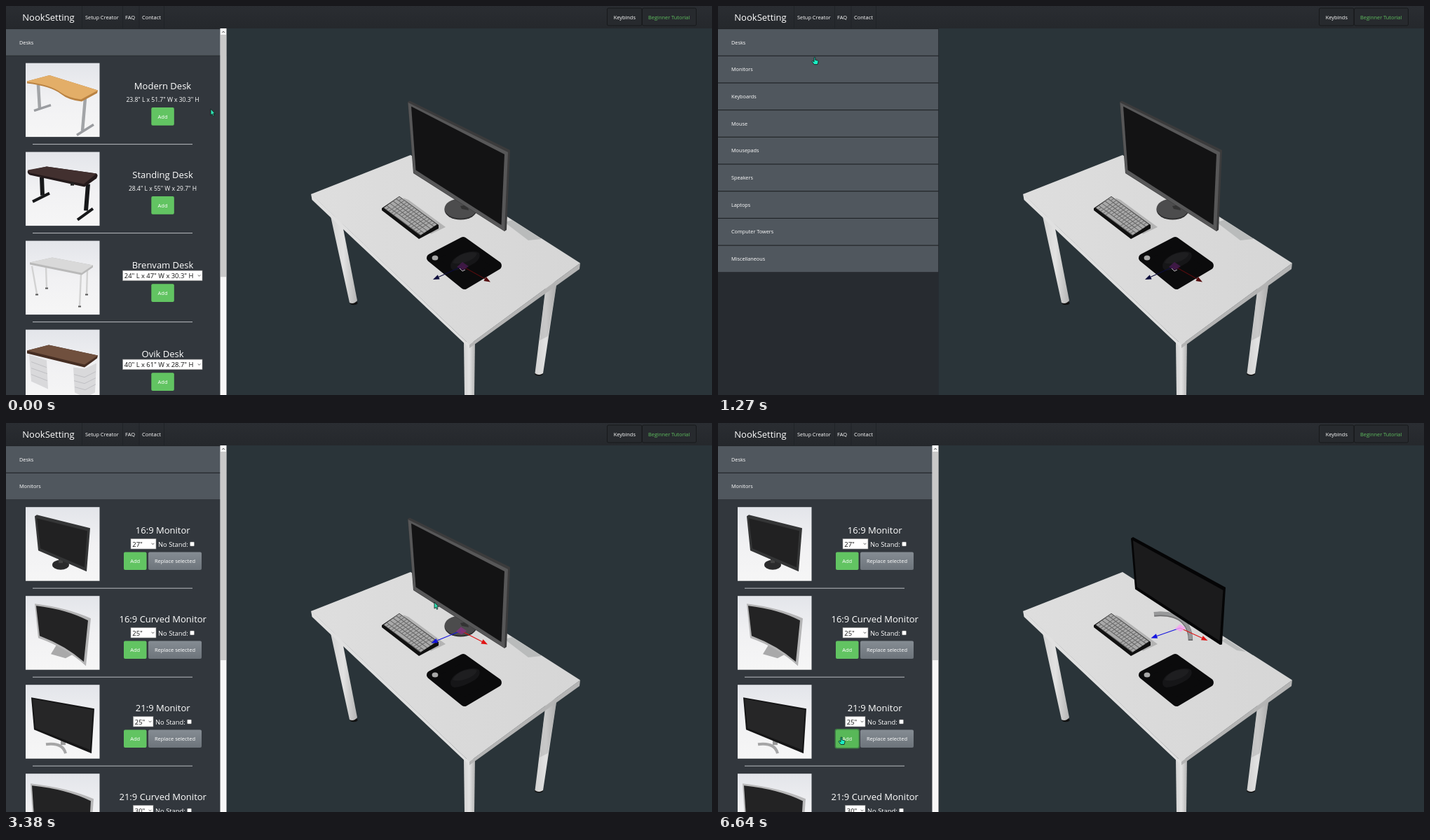
Write an HTML page that moves like this. It is 1007x556 px and loops after 6.82 s.

```html
<!DOCTYPE html>
<html lang="en">
<head>
<meta charset="utf-8">
<title>Desk planner</title>
<style>
html, body { margin: 0; width: 100%; height: 100%; overflow: hidden; background: #272b30; }
svg { display: block; width: 1007px; height: 556px; }
text { font-family: "Open Sans", "Noto Sans", sans-serif; fill: #fff; }
</style>
</head>
<body>
<svg id="stage" viewBox="0 0 1007 556"></svg>
<script>
const LOOP = 6820, ROW = 38.7, TOP = 32.5;

// Drawing helpers
const path = (d, fill, extra = '') => `<path d="${d}" fill="${fill}" ${extra}/>`;
const line = (d, color, width, extra = '') => path(d, 'none', `stroke="${color}" stroke-width="${width}" ${extra}`);
const rect = (x, y, w, h, fill, extra = '') => `<rect x="${x}" y="${y}" width="${w}" height="${h}" fill="${fill}" ${extra}/>`;
const oval = (x, y, rx, ry, fill, extra = '') => `<ellipse cx="${x}" cy="${y}" rx="${rx}" ry="${ry}" fill="${fill}" ${extra}/>`;
const text = (x, y, size, s, extra = '') => `<text x="${x}" y="${y}" font-size="${size}" ${extra}>${s}</text>`;
const mid = (x, y, size, s, extra = '') => text(x, y, size, s, 'text-anchor="middle" ' + extra);
const group = (id, body, extra = '') => `<g id="${id}" ${extra}>${body}</g>`;
const gradient = (id, stops, dir = '') => `<linearGradient id="${id}" ${dir}>` +
  stops.map((c, i) => `<stop offset="${i / (stops.length - 1)}" stop-color="${c}"/>`).join('') + '</linearGradient>';

const defs = '<defs>' +
  gradient('nav', ['#2a2d32', '#25282c'], 'x2="0" y2="1"') +
  gradient('photo', ['#e3e5ea', '#f1f1f3', '#f6f6f6'], 'x2="0" y2="1"') +
  gradient('grey', ['#858c93', '#6d747b'], 'x2="0" y2="1"') +
  gradient('leg', ['#d2d2d2', '#e2e2e2', '#b4b4b4']) +
  gradient('top', ['#dedede', '#d6d6d6']) +
  '<clipPath id="clip"><rect id="clipBox" width="315"/></clipPath></defs>';

// Thumbnails, drawn in a 105 px square
const feet = (d, color, width) => line(d, color, width, 'stroke-linejoin="round"');
const thumbs = {
  modern: feet('M18 31L20 65M85 50L81 97', '#a2a4a7', 4.5) + feet('M12 68L36 60M73 103L97 88', '#9a9ca0', 3.5) +
    path('M2 26L34 17.5L103 39L102 43L80 55Q61 53 50 44Q36 33 2 29z', '#b98242') +
    path('M2 26L34 17.5L103 39L79 52Q61 50 50 42Q36 31 2 27z', '#e3ae68'),
  standing: feet('M23 36L24 62M89 46L86 84', '#17181a', 6) + feet('M10 71L34 59M74 97L96 81', '#17181a', 4) +
    path('M3 27L30 21L101 31Q104 33 101 38L84 50L6 33Q2 31 3 27z', '#241a1b') +
    path('M3 26L30 21L101 31L83 46L6 30z', '#42302f') + rect(64, 44, 5, 4, '#222'),
  white: feet('M9 36L16 76M29 38L30 67M88 42L87 76M79 48L77 93', '#d2d2d2', 2.4) +
    path('M14 76h4v2h-4zM28 67h4v2h-4zM85 76h4v2h-4zM75 93h4v2h-4z', '#555') +
    path('M6 31L38 24L96 35L96 38L80 49L6 34z', '#b9b9b9') + path('M6 31L38 24L96 35L80 46z', '#d9d9d9'),
  drawers: path('M5 36L30 44L32 85L8 74zM68 54L84 56L101 48L99 90L85 97L70 90z', '#d9d9db') +
    line('M8 46L30 54M8 55L31 63M8 64L31 73M69 64L84 68L100 60M69 73L84 77L100 69M70 82L85 86L100 78', '#b9b9bd', .8) +
    path('M2 30L33 22L103 37L102 41L84 54L2 34z', '#452d22') + path('M2 30L33 22L103 37L84 50z', '#70503e'),
  flat: oval(50, 82.5, 12, 7, '#2b2b2c') + rect(47, 72, 6, 8, '#444') +
    path('M13 13L16 11L92 30L87 92L18 62z', '#343536') + path('M16 16L88 34L84 86L21 59z', '#212122'),
  curved: path('M44 70L36 83L57 89L70 82z', '#a9a9aa') +
    path('M13 11Q60 17 93 32L86 100Q58 74 18 60z', '#b4b4b5') + path('M15 14Q58 19 89 35L83 94Q57 71 20 57z', '#232324'),
  wide: line('M29 85Q53 82 57 98', '#a5a5a6', 4) + rect(50, 76, 7, 10, '#999') +
    path('M8 18L98 34L94 98L12 64z', '#151516') + path('M10 20L96 36L92 93L14 62z', '#262627'),
  arc: path('M7 14Q60 20 97 36L92 105H13z', '#b8b8b9') + path('M9 17Q58 22 93 39L89 105H15z', '#232324')
};

// Sidebar items
const button = (x, y, w, label, fill) => rect(x, y, w, 25.6, fill, 'rx="2"') +
  mid(x + w / 2, y + 15.6, 7.5, label);
const select = (x, y, w, label) => rect(x, y, w, 14.5, '#fff', 'stroke="#8a8a8a" stroke-width=".6"') +
  text(x + 2.3, y + 11, 9.4, label, 'style="fill:#111"') +
  line(`M${x + w - 6.3} ${y + 6.3}l1.8 1.8l1.8 -1.8`, '#444', .9);
const item = (y, kind, info, last) =>
  `<g class="pic"><g transform="translate(28 ${y})">${rect(0, 0, 105.5, 105.5, 'url(#photo)')}${thumbs[kind]}</g></g>` +
  `<g class="info">${info}</g>` + (last ? '' : line(`M38 ${y + 116}H266`, '#b9bcc0', 1));

const desk = (i, kind, name, size, list) => {
  const y = 81.6 + 127 * i, add = '#62c462';
  return item(y, kind, mid(223.5, y + (list ? 39.8 : 37.5), 13, name) + (list
    ? select(166.5, y + 42.5, 113.5, size) + button(207.3, y + 61.7, 32.5, 'Add', add)
    : mid(223.5, y + 55.3, 8.56, size) + button(207.3, y + 63.5, 32.5, 'Add', add)), i > 3);
};
const monitor = (i, kind, name, size) => {
  const y = 120.2 + 127 * i, x = i < 2 ? 178 : 181.5, w = i < 2 ? 36 : 28.5, end = x + w;
  return item(y, kind, mid(223.7, y + 37.5, 13, name) + select(x, y + 45.3, w, size) +
    text(end + 3, y + 56.3, 9.4, 'No Stand:') +
    rect(end + 48.5, y + 49.8, 6, 6, '#fff', 'rx="1" stroke="#777" stroke-width=".5"') +
    button(168, y + 64.3, 32.5, 'Add', '#62c462') + button(203, y + 64.3, 76, 'Replace selected', 'url(#grey)'));
};

const headers = ['Desks', 'Monitors', 'Keyboards', 'Mouse', 'Mousepads', 'Speakers', 'Laptops', 'Computer Towers', 'Miscellaneous'];
const sidebar = rect(0, 32, 314.5, 524, '#272b30') +
  '<g clip-path="url(#clip)">' + rect(0, 32, 315, 524, '#32373d') +
  group('desks', desk(0, 'modern', 'Modern Desk', '23.8" L x 51.7" W x 30.3" H') +
    desk(1, 'standing', 'Standing Desk', '28.4" L x 55" W x 29.7" H') +
    desk(2, 'white', 'Brenvam Desk', '24" L x 47" W x 30.3" H', true) +
    desk(3, 'drawers', 'Ovik Desk', '40" L x 61" W x 28.7" H', true)) +
  group('monitors', monitor(0, 'flat', '16:9 Monitor', '27"') + monitor(1, 'curved', '16:9 Curved Monitor', '25"') +
    monitor(2, 'wide', '21:9 Monitor', '25"') + monitor(3, 'arc', '21:9 Curved Monitor', '30"') +
    group('hover', rect(167.3, 437.8, 34, 27, 'none', 'rx="2.5" stroke="#3f7f45" stroke-width="1.6"') +
      button(168, 438.5, 32.5, 'Add', '#58b858'))) + '</g>' +
  headers.map(h => `<g class="head">${rect(0, 0, 314.5, ROW, '#1d2023')}${rect(0, .6, 314.2, ROW - 1.1, '#50575e')}` +
    text(19, 22, 7.3, h) + '</g>').join('') +
  group('scroll', rect(305.5, 32, 9, 524, '#f7f7f7') + rect(306, 41, 8, 0, '#c9c9c9', 'id="thumb"') +
    line('M308.3 38.2L310.1 36.2L311.9 38.2', '#444', 1));

const nav = rect(0, 0, 1007, 32, 'url(#nav)') +
  line('M108.5 0V32M166.5 0V32M190 0V32M225.5 0V32', '#1f2226', .8) +
  text(23.3, 21.2, 13, 'NookSetting') + text(113, 18.8, 7.42, 'Setup Creator') +
  text(170, 18.8, 7.5, 'FAQ') + text(194, 18.8, 7.5, 'Contact') +
  rect(857.5, 3, 49.5, 25, '#272a2e', 'rx="2" stroke="#17191b"') +
  rect(907.5, 3, 77, 25, '#272a2e', 'rx="2" stroke="#17191b"') +
  mid(882.3, 18.8, 7.4, 'Keybinds') + mid(945.7, 18.8, 7.4, 'Beginner Tutorial', 'style="fill:#5fbf5f"');

// Scene
const keyboard = () => {
  const at = (u, v) => `${561 - 22.5 * u + 54 * v - u * v} ${272.5 + 16 * u + 40 * v - u * v}`;
  const key = (r, c, w) => {
    const u = (r + .08) / 5, U = (r + .88) / 5, v = (c + .1) / 15, V = (c + w - .1) / 15;
    return path(`M${at(u, v)}L${at(u, V)}L${at(U, V)}L${at(U, v)}z`, '#a9a9a9');
  };
  let keys = '';
  for (let r = 0; r < 5; r++)
    for (let c = 0, w; c < 15; c += w) {
      w = r == 4 && c == 4 ? 6 : r && r < 4 && (c == 0 || c == 13) ? 2 : 1;
      keys += key(r, c, w);
    }
  return path('M566 274L574 277L627 316L606 326z', '#b3b3b3') +
    path('M561 272L536 289L536 292L589 333L617 318L617 313z', '#101010') +
    path('M561 272L538.5 288.5L591 328L615 312z', '#666') + keys;
};

const gizmo = (x, y, [bx, by], [rx, ry], [blue, red, box], size = 1) => {
  const arrow = (ex, ey, color) => {
    const d = Math.hypot(ex - x, ey - y), ux = (ex - x) / d, uy = (ey - y) / d;
    const hx = ex - 9 * ux, hy = ey - 9 * uy;
    return line(`M${x} ${y}L${hx} ${hy}`, color, 1.1) +
      path(`M${ex} ${ey}L${hx - 3.4 * uy} ${hy + 3.4 * ux}L${hx + 3.4 * uy} ${hy - 3.4 * ux}z`, color);
  };
  return arrow(bx, by, blue) + arrow(rx, ry, red) +
    path('M0 -6L9 0L1 6L-8 1z', box, `fill-opacity=".8" transform="translate(${x} ${y}) scale(${size})"`);
};

const padShape = 'M652 336L606 360L654 399L701 371z';
const mousePad = path(padShape, '#0b0b0c', 'stroke="#0b0b0c" stroke-width="12" stroke-linejoin="round"') +
  oval(612, 360, 4.4, 3.6, '#a8a8a8') +
  path('M634 371Q635 361 651 354Q668 348 675 353Q678 360 669 367Q653 377 640 378Q634 377 634 371z', '#161618') +
  path('M637 367Q641 358 653 354Q667 350 672 354Q668 362 656 366Q645 370 637 367z', '#1e1e20');

const bigMonitor = path('M711 309L745 335L764 333L722 306z', '#b9bbbb') +
  oval(648.5, 291.5, 23, 14, '#2f2f30') + oval(648.5, 289.5, 23, 14, '#4c4c4d') + path('M648 286L658 284L660 292L650 290z', '#333') +
  path('M573 137L576 135.5L719 206L714 320L711 322L581 239z', '#3b3b3c') +
  path('M573.5 138L716 209L711 321.5L581.5 238.5z', '#575758') + path('M578 143.5L711 212L706.5 313L584.5 234.5z', '#131314');

const slimMonitor = path('M718 311L740 325L753 327L724 308z', '#b9bbbb') +
  line('M622 273.5Q651 271 664 284Q674 294 674 311', '#6f6f70', 6.5) +
  line('M622 272.5Q651 270 664 283Q674 293 674 309', '#98999a', 5) +
  path('M589 165L592 163L724 235L719 316.5L716 317L595 237.5z', '#050506') +
  path('M592 168L720.5 239L715.5 311.5L597.5 234.5z', '#1b1b1c');

const bright = ['#1414e0', '#e01414'];
const scene = rect(314.5, 32, 692.5, 524, '#2a3439') +
  oval(496, 424.5, 5.5, 2.8, '#111') + path('M462 296L479 308L501 421Q496 427 490 424z', 'url(#leg)') +
  oval(760, 525.5, 6, 3, '#111') + path('M770 400L786 393L766 525Q760 529 754.5 525z', 'url(#leg)') +
  path('M770 400L786 393L773 472L761 478z', '#999', 'opacity=".35"') +
  path('M653 480H669L668 556H654z', 'url(#leg)') +
  path('M435 268.5L661 484L661 489L436.5 277z', '#e0e0e0') +
  path('M661 484L819 367.5L818 376L661 489z', '#b4b4b4') +
  path('M577 213L435 269L661 484L819 367.5z', 'url(#top)') +
  group('big', bigMonitor) + group('slim', slimMonitor) + keyboard() + mousePad +
  group('onMouse', gizmo(651, 372, [609, 391], [691, 394.5], ['#0c0c3c', '#540c0e', '#471a50']) +
    line('M647 375L651 379L655 377', '#bbb', 1)) +
  group('onBig', gizmo(649, 297, [606.5, 314.5], [687, 316.5], [...bright, '#85357f'], .9)) +
  group('onSlim', gizmo(659, 293, [617.5, 307.5], [698.5, 311], [...bright, '#f7a0f0'], .9));

const skin = 'stroke="#111" stroke-width=".8" stroke-linejoin="round"';
const cursor = group('cursor',
  group('arrow', path('M0 0V9.2L2.1 7.4L3.5 10.4L5 9.7L3.6 6.8H6.2z', '#2fe3b4', skin)) +
  group('hand', path('M0 .5Q1 -.6 1.8 .5V4L5.5 4.9Q6.3 5.3 6 7L5 10.5H.2L-2.8 6.6Q-2.8 5 -1.4 5.6L0 6.8z', '#19efc4', skin)));

const stage = document.getElementById('stage');
stage.innerHTML = defs + scene + sidebar + nav + cursor;

// Motion
const $ = id => document.getElementById(id);
const show = (id, on) => $(id).style.display = on ? '' : 'none';
const shift = (el, x, y) => el.setAttribute('transform', `translate(${x} ${y})`);
const clamp = x => Math.min(1, Math.max(0, x));

// The standard "ease" curve, solved by bisection
function ease(x) {
  let lo = 0, hi = 1, s = .5;
  for (let i = 0; i < 20; i++) {
    const q = 1 - s, bx = .75 * s * q * q + .75 * s * s * q + s ** 3;
    if (bx < x) lo = s; else hi = s;
    s = (lo + hi) / 2;
  }
  return .3 * s * (1 - s) ** 2 + 3 * s * s * (1 - s) + s ** 3;
}

const route = [
  [50, 292, 147], [130, 248, 112], [220, 180, 70], [310, 150.5, 54], [1120, 150.5, 54], [1270, 137, 73],
  [1400, 135.5, 88.5], [2220, 135.5, 88.5], [2400, 185, 118], [2700, 335, 205], [2890, 417, 238],
  [3020, 545, 250], [3150, 611, 256], [4140, 611, 256], [4300, 520, 318], [4550, 322.5, 421.5],
  [4700, 226, 446], [4810, 188, 452], [4900, 175, 449], [LOOP, 175, 449]
];
function place(t) {
  if (t <= route[0][0]) return route[0].slice(1);
  const i = route.findIndex(k => k[0] >= t), [a, ax, ay] = route[i - 1], [b, bx, by] = route[i];
  const u = (t - a) / (b - a);
  return [ax + (bx - ax) * u, ay + (by - ay) * u];
}

function draw(t) {
  const first = t < 1350;
  const open = first ? 503 * (1 - ease(clamp((t - 740) / 350))) : 641 * ease(clamp((t - 1620) / 350));
  const total = 349 + open, scroll = total > 543;
  document.querySelectorAll('.head').forEach((el, i) =>
    shift(el, 0, TOP + ROW * i + (i > (first ? 0 : 1) ? open : 0)));
  $('clipBox').setAttribute('y', TOP + ROW * (first ? 1 : 2));
  $('clipBox').setAttribute('height', open);
  document.querySelectorAll('.pic').forEach(el => shift(el, scroll ? 0 : 3, 0));
  document.querySelectorAll('.info').forEach(el => shift(el, scroll ? 0 : 7, 0));
  $('thumb').setAttribute('height', 295000 / total);
  show('scroll', scroll);
  show('desks', first);
  show('monitors', !first);
  show('hover', t >= 4860);
  show('big', t < 3880);
  show('slim', t >= 5710);
  show('onMouse', t < 3320);
  show('onBig', t >= 3320 && t < 3880);
  show('onSlim', t >= 5710);
  const hand = t > 1180 && t < 2330 || t >= 4860;
  show('hand', hand);
  show('arrow', !hand);
  shift($('cursor'), ...place(t));
}

const start = performance.now();
function tick() {
  draw((performance.now() - start) % LOOP);
  requestAnimationFrame(tick);
}
tick();
</script>
</body>
</html>
```
